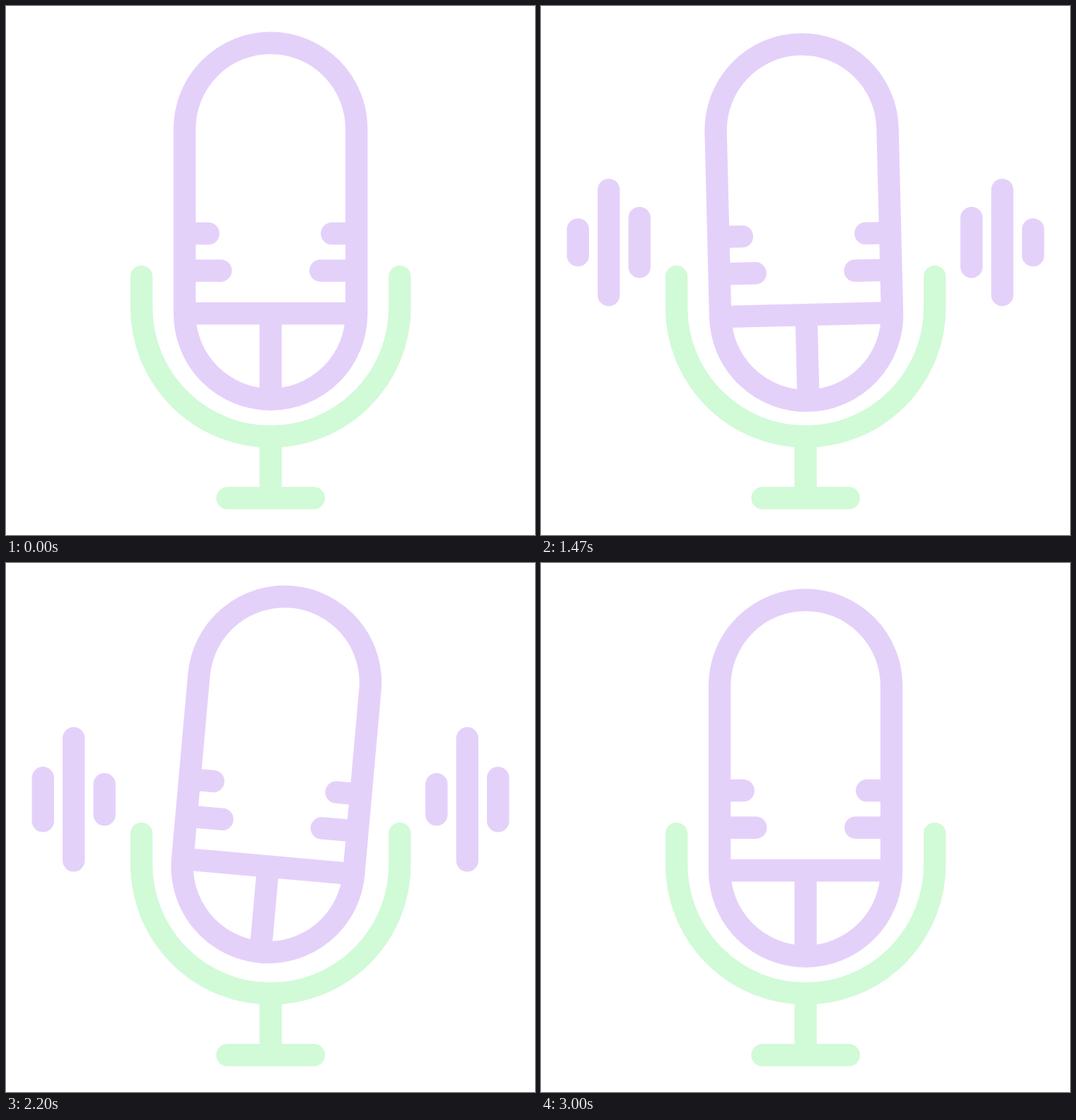
An HTML page for the animation above (3.02 s loop, 748 by 748 pixels).

```html
<!DOCTYPE html>
<html lang="en">
<head>
<meta charset="utf-8">
<title>Microphone</title>
<style>
  html, body { margin: 0; width: 100%; height: 100%; overflow: hidden; background: #fff; }
  svg { display: block; width: 100%; height: 100%; }
  path { fill: none; stroke-width: 31.4; stroke-linecap: round; stroke-linejoin: round; }
  .stand { stroke: #d1fad7; }
  .voice { stroke: #e4d1fa; }
</style>
</head>
<body>
<svg viewBox="0 0 748 748">
  <path class="stand" d="M191.6 382.7V426.2a182.6 182.6 0 0 0 365.2 0V382.7M374.2 609V695.8M313 695.8H435.3"/>
  <path class="voice" id="mic" d="M252.6 173.7a121.5 121.5 0 0 1 243 0V434.8a121.5 121.5 0 0 1 -243 0ZM252.6 434.8H495.6M374.1 434.8V556M252.6 321.8H286.2M252.6 374.2H303.7M495.6 321.8H460.8M495.6 374.2H444.7"/>
  <path class="voice" id="bars"/>
</svg>
<script>
const LOOP = 3020, STEP = 25, PAUSE = 1, DURATION = 2;
const CENTER_X = 374, PIVOT_Y = 396, BAR_Y = 334.3, BAR_GAP = 43.5;
const mic = document.getElementById('mic');
const bars = document.getElementById('bars');

// Turning points of the mic, in seconds: height below rest and lean in degrees.
const drop = [[-.02, 0], [.24, 52], [.575, -11], [.8, 52], [1.1, -15], [1.4, 22.5], [2, 0]];
const tilt = [[0, 0], [.1, -1.5], [.3, 2.95], [.6, -4], [1.18, 5.15], [1.55, -1.4], [2, 0]];

// Bar lengths on shared beats, from inner to outer; flex bulges them between beats.
const beats = [-.03, .2, .675, 1.2, 1.6, 2];
const waves = [
  { lengths: [0, 49, 46, 43, 123, 0], flex: .5 },
  { lengths: [0, 177, 171, 173, 114, 0], flex: -.15 },
  { lengths: [0, 61, 22, 61, 31, 0], flex: 0 }
].map(({ lengths, flex }, i) => ({
  keys: beats.map((beat, k) => [beat, lengths[k]]),
  flex,
  offset: 234.75 + i * BAR_GAP
}));

// Sine easing from one turning point to the next.
function swing(keys, t, flex = 0) {
  const next = keys.findIndex(([time], i) => i > 0 && t <= time);
  const [t0, from] = keys[next - 1], [t1, to] = keys[next];
  const x = (t - t0) / (t1 - t0);
  const eased = from + (to - from) * Math.sin(x * Math.PI / 2) ** 2;
  return eased * (1 + flex * Math.sin(x * Math.PI) ** 2);
}

function barPath({ keys, flex, offset }, t) {
  const length = swing(keys, t, flex);
  return [-offset, offset]
    .map(dx => `M${CENTER_X + dx} ${BAR_Y - length / 2}v${length}`)
    .join('');
}

function draw(ms) {
  const step = Math.floor((ms % LOOP + 5) / STEP);
  const t = step * STEP / 1000 - PAUSE;
  const moving = t > 0 && t < DURATION;
  mic.setAttribute('transform', moving
    ? `translate(0 ${swing(drop, t)}) rotate(${swing(tilt, t)} ${CENTER_X} ${PIVOT_Y})`
    : '');
  bars.setAttribute('d', moving ? waves.map(wave => barPath(wave, t)).join('') : '');
}

const start = performance.now();
function tick() {
  draw(performance.now() - start);
  requestAnimationFrame(tick);
}
tick();
</script>
</body>
</html>
```
